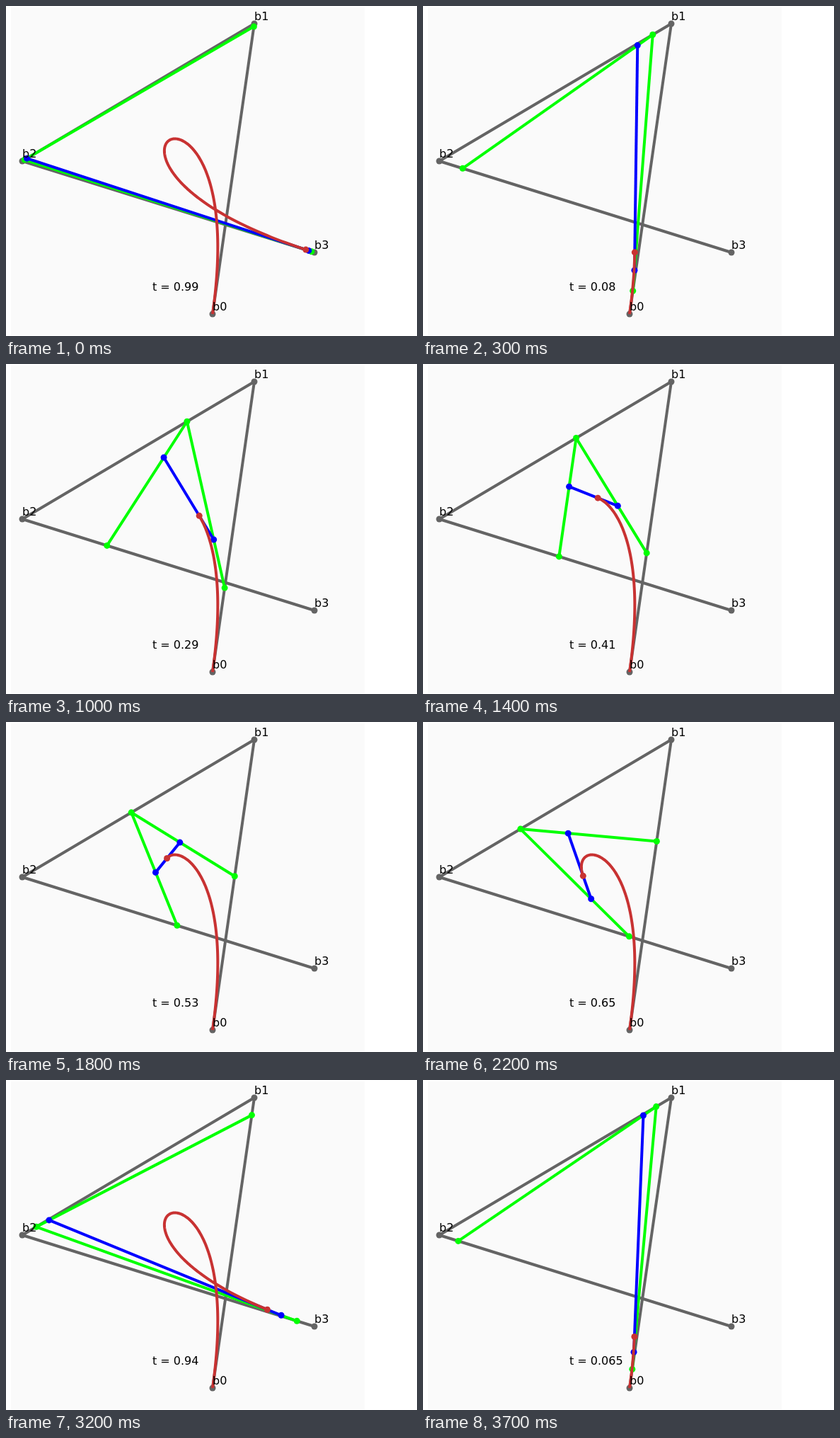
An HTML page with a canvas that plays this animation: 581x466 px, repeating every 3.8 s.

```html
<!DOCTYPE html>
<html>
<head>
<meta charset="utf-8">
<title>Cubic Bézier construction</title>
<style>
html, body { margin: 0; width: 100%; height: 100%; overflow: hidden; background: #fff; }
canvas { display: block; }
</style>
</head>
<body>
<canvas id="stage" width="581" height="466"></canvas>
<script>
const ctx = document.getElementById('stage').getContext('2d');
const GRAY = '#646464', GREEN = '#00ff00', BLUE = '#0000ff', RED = '#c83232';
const control = [[292, 435], [351, 25], [23, 219], [436, 348]];
const STEP = 100, LOOP = 3800;

// Curve parameter for each 100 ms step; the pace varies slightly late in the loop.
function paramAt(step) {
  let t;
  if (step <= 24) t = 0.03 * step - 0.01;
  else if (step === 25) t = 0.71;
  else if (step <= 27) t = 0.78;
  else if (step <= 32) t = 0.82 + 0.03 * (step - 28);
  else t = 0.94 + 0.025 * (step - 32);
  return +((t + 1) % 1).toFixed(3);
}

// One round of de Casteljau interpolation.
function reduce(points, t) {
  return points.slice(1).map(([x, y], i) => {
    const [px, py] = points[i];
    return [px + (x - px) * t, py + (y - py) * t];
  });
}

function curvePoint(t) {
  let points = control;
  while (points.length > 1) points = reduce(points, t);
  return points[0];
}

function line(points, color) {
  ctx.strokeStyle = color;
  ctx.beginPath();
  points.forEach(p => ctx.lineTo(...p));
  ctx.stroke();
}

function dots(points, color) {
  ctx.fillStyle = color;
  for (const [x, y] of points) {
    ctx.beginPath();
    ctx.arc(x, y, 4.5, 0, 2 * Math.PI);
    ctx.fill();
  }
}

function polygon(points, color) {
  line(points, color);
  dots(points, color);
}

function draw(t) {
  ctx.fillStyle = '#fff';
  ctx.fillRect(0, 0, 581, 466);
  ctx.fillStyle = '#fafafa';
  ctx.fillRect(7, 2, 500, 463);
  ctx.lineWidth = 4;
  ctx.lineJoin = 'round';

  const first = reduce(control, t), second = reduce(first, t);
  polygon(control, GRAY);
  polygon(first, GREEN);
  polygon(second, BLUE);

  const trail = [];
  for (let s = 0; s < t; s += 0.005) trail.push(curvePoint(s));
  trail.push(curvePoint(t));
  line(trail, RED);
  dots([curvePoint(t)], RED);

  ctx.fillStyle = '#000';
  ctx.font = '16px "DejaVu Sans", sans-serif';
  control.forEach(([x, y], i) => ctx.fillText('b' + i, x, y - 5));
  ctx.fillText('t = ' + t, 207, 402);
}

function tick() {
  draw(paramAt(Math.floor(performance.now() % LOOP / STEP)));
  requestAnimationFrame(tick);
}
tick();
</script>
</body>
</html>
```
